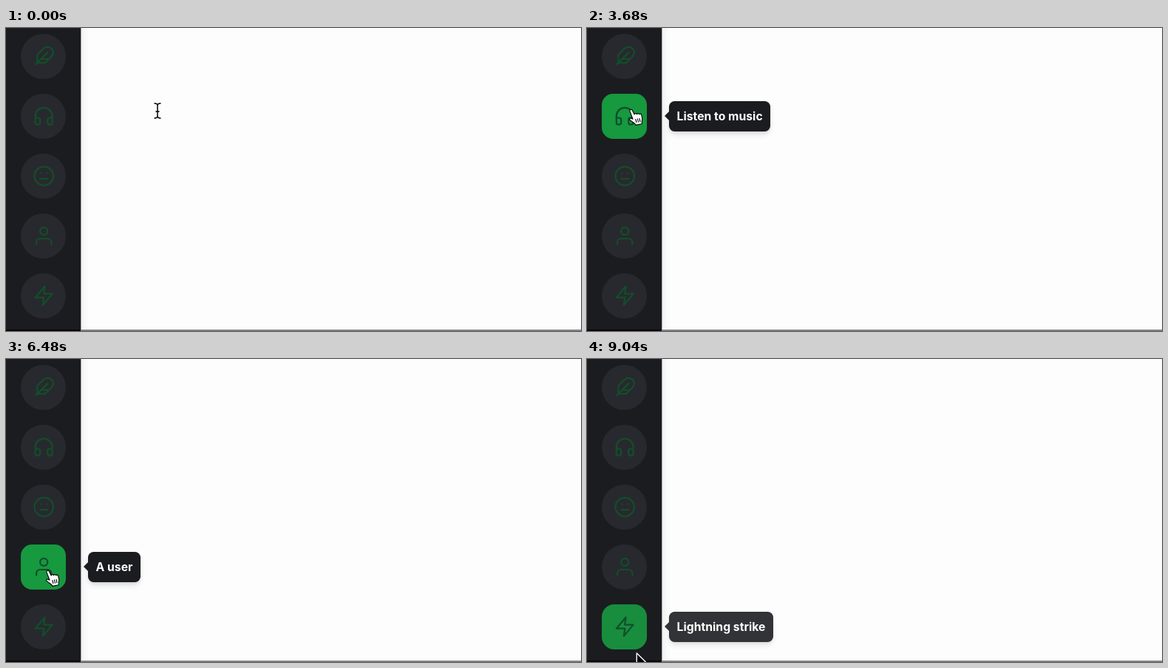
An HTML page that plays this animation: 778x410 px, repeating every 9.12 s.

```html
<!DOCTYPE html>
<html lang="en">
<head>
<meta charset="utf-8">
<title>Sidebar tooltips</title>
<style>
  html, body { margin: 0; width: 100%; height: 100%; overflow: hidden; background: #fdfdfd; }
  #stage { position: relative; width: 778px; height: 410px; overflow: hidden; }
  #bar {
    position: absolute; left: 0; top: -20px; width: 101px; height: 450px;
    background: #1b1c20; border-right: 1px solid #a5a5a7; box-shadow: 0 0 12px rgba(0, 0, 0, .09);
  }
  #edge { position: absolute; left: 0; top: 408px; width: 778px; height: 2px; background: #8a8488; }
  #edge::before { content: ""; position: absolute; width: 101px; height: 100%; background: #0c0508; }
  .item {
    position: absolute; left: 20.4px; width: 60.8px; height: 60.8px;
    display: grid; place-items: center;
  }
  .item svg {
    width: 30.4px; height: 30.4px; fill: none; stroke: #124e2a;
    stroke-width: 1.75; stroke-linecap: round; stroke-linejoin: round;
  }
  .tip {
    position: absolute; left: 111.4px; height: 40.5px; padding: 0 10.2px;
    border-radius: 7.6px; background: #1b1c20; color: #fff;
    font: 700 15.75px/41.5px Inter, sans-serif; white-space: nowrap;
    box-shadow: 0 5px 8px -1px rgba(0, 0, 0, .12), 0 2px 5px -1px rgba(0, 0, 0, .08);
  }
  .tip::before {
    content: ""; position: absolute; left: -6px; top: 14px;
    border: solid transparent; border-width: 6.2px 6.2px 6.2px 0; border-right-color: #1b1c20;
  }
  #cursor { position: absolute; left: 0; top: 0; width: 1px; height: 1px; overflow: visible; }
  #cursor path { stroke-linejoin: round; stroke-linecap: round; }
</style>
</head>
<body>
<div id="stage">
  <div id="bar"></div>
  <div id="edge"></div>
  <svg id="cursor">
    <defs><path id="stem" d="M-4-10Q0-10 0-7Q0-10 4-10M0-7V7M-4 10Q0 10 0 7Q0 10 4 10M-2 1H2"/></defs>
    <g id="beam" fill="none">
      <use href="#stem" stroke="#fff" stroke-width="3"/>
      <use href="#stem" stroke="#000" stroke-width="1.5"/>
    </g>
    <path id="arrow" d="M0 0V19.5L4.6 15.2L7.6 22.4L11 21L8 14H14Z" fill="#000" stroke="#fff" stroke-width="1.4"/>
    <path id="hand" fill="#fff" stroke="#000" transform="translate(-1.5 -.5) rotate(-7) scale(1.12)"
      d="M-1.6 1.5C-1.9-.2 .9-.9 1.5 .9L3.4 6.2C3.8 4.9 6 4.8 6.4 6.3C7 5.1 8.9 5.3 9.3 6.8C10 5.9 11.5 6.2 11.8 7.8L12.2 11.8C12.3 13.8 11.4 14.8 11.2 16.3L11 18.6L3.2 19.2L2.8 17.6C1.4 16.3-.2 14.4-2 12.9C-3.9 11.2-3 9.6-1.2 10.3L.8 11.6Z
         M4.2 12.2L4.7 16M6.6 12L7 15.8M9 11.8L9.2 15.6"/>
  </svg>
</div>
<script>
const LOOP = 9120, STEP = 80, FADE = 300;
const SIZE = 60.8, PITCH = 81, TOP = 7.8, LEFT = 20.4;

const items = [
  ['A feather', 'M20.24 12.24a6 6 0 0 0-8.49-8.49L5 10.5V19h8.5zM16 8L3.5 20.5M17.5 15H9'],
  ['Listen to music', 'M3 18v-6a9 9 0 0 1 18 0v6M21 19a2 2 0 0 1-2 2h-1a2 2 0 0 1-2-2v-3a2 2 0 0 1 2-2h3zM3 19a2 2 0 0 0 2 2h1a2 2 0 0 0 2-2v-3a2 2 0 0 0-2-2H3z'],
  ['Happy', 'M2 12a10 10 0 0 1 20 0a10 10 0 0 1-20 0M8 15h8M9 9h.01M15 9h.01'],
  ['A user', 'M20 21v-2a4 4 0 0 0-4-4H8a4 4 0 0 0-4 4v2M8 7a4 4 0 0 1 8 0a4 4 0 0 1-8 0'],
  ['Lightning strike', 'M13 2L3 14h9l-1 8 10-12h-9z']
];

// pointer moves: start, end, x, y
const moves = [
  [0, 960, 61, 37], [1680, 2440, 61, 111], [3680, 4360, 59, 184], [4560, 4880, 58, 193],
  [5600, 6320, 58, 287], [7390, 8080, 60, 366], [8860, 9400, 76, 436]
];

const stage = document.getElementById('stage');
const cursor = document.getElementById('cursor');
const shapes = ['beam', 'arrow', 'hand'].map(id => document.getElementById(id));
const clamp = v => Math.max(0, Math.min(1, v));
const mix = (a, b, k) => a + (b - a) * k;
const easeOut = k => 1 - (1 - k) ** 1.5;

function pointer(t) {
  let x = 205, y = 112;
  for (const [from, to, nx, ny] of moves) {
    const k = easeOut(clamp((t - from) / (to - from)));
    x = mix(x, nx, k);
    y = mix(y, ny, k);
  }
  return [x, y];
}

// Entering needs the round shape, staying only the square one.
function hoverSpan(top) {
  const half = SIZE / 2;
  let from = LOOP, inside = false;
  for (let t = 0; t < LOOP; t += 4) {
    const [x, y] = pointer(t);
    const dx = Math.abs(x - LEFT - half), dy = Math.abs(y - top - half);
    if (!inside && Math.hypot(dx, dy) < half) {
      inside = true;
      from = t;
    } else if (inside && Math.max(dx, dy) > half) {
      return [from, t];
    }
  }
  return [from, LOOP];
}

function add(className, top, html) {
  const el = document.createElement('div');
  el.className = className;
  el.style.top = top + 'px';
  el.innerHTML = html;
  return stage.insertBefore(el, cursor);
}

const views = items.map(([label, icon], i) => {
  const top = TOP + i * PITCH;
  return {
    item: add('item', top, `<svg viewBox="0 0 24 24"><path d="${icon}"/></svg>`),
    tip: add('tip', top + 10.2, label),
    span: hoverSpan(top)
  };
});

function render(t) {
  let hovered = false;
  for (const { item, tip, span: [from, to] } of views) {
    const k = clamp((t - from) / FADE) - clamp((t - to) / FADE);
    hovered = hovered || (t >= from && t < to);
    const rgb = [mix(40, 22, k), mix(41, 153, k), mix(46, 63, k)].map(Math.round);
    item.style.background = `rgb(${rgb})`;
    item.style.borderRadius = mix(SIZE / 2, SIZE / 4, k) + 'px';
    tip.style.opacity = k;
  }
  const [x, y] = pointer(t);
  const shape = hovered ? 2 : x > 101 ? 0 : 1;
  shapes.forEach((s, i) => { s.style.display = i === shape ? '' : 'none'; });
  cursor.style.transform = `translate(${x}px, ${y}px)`;
}

const start = performance.now();
function tick() {
  const t = (performance.now() - start) % LOOP;
  render(Math.floor(t / STEP) * STEP);
  requestAnimationFrame(tick);
}
render(0);
requestAnimationFrame(tick);
</script>
</body>
</html>
```
